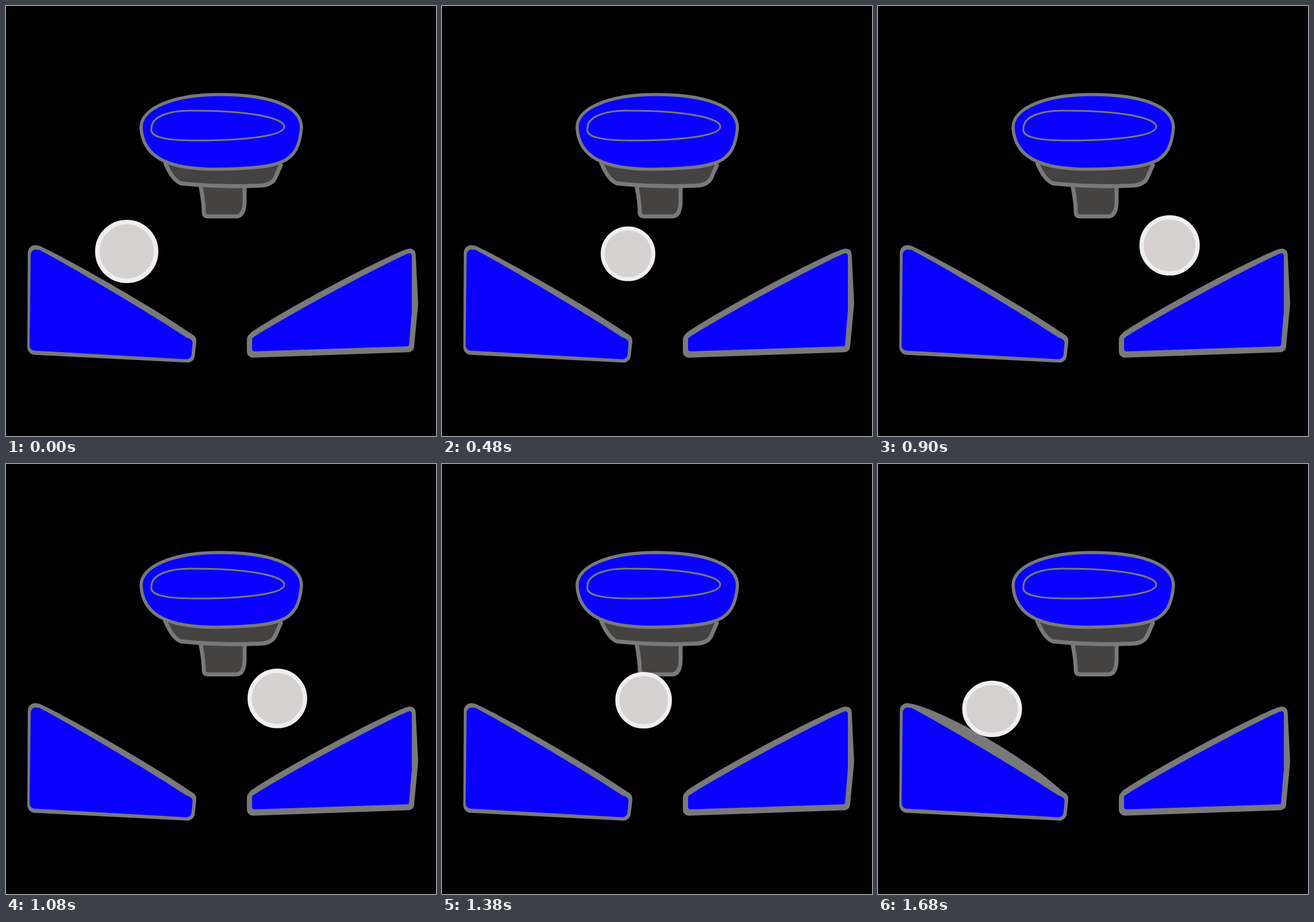
An HTML page with a canvas that plays this animation: 748x748 px, repeating every 1.74 s.

```html
<!DOCTYPE html>
<html>
<head>
<meta charset="utf-8">
<style>
html, body { margin: 0; width: 100%; height: 100%; overflow: hidden; background: #000; }
canvas { display: block; }
</style>
</head>
<body>
<canvas id="stage" width="748" height="748"></canvas>
<script>
const ctx = document.getElementById('stage').getContext('2d');
const STEP = 60, COUNT = 29;
const GRAY = '#797979', BLUE = '#0a00ff', DARK = '#444341';

const HEAD = 'M235,212 C234,178 290,154 372,154 S514,172 514,212 C508,275 480,282 365,284 C280,284 238,262 235,212 Z';
const SLOT = 'M253,213 C253,190 290,181 325,182 C420,182 484,194 484,210 C484,228 400,234 330,234 C270,234 250,226 253,213 Z';
const POST = 'M337,305 Q344,340 344,358 Q344,366 352,366 H400 Q414,366 415,342 V305';
const cup = bottom =>
  `M277,273 Q289,302 304,${bottom - 4} Q372,${bottom + 3} 440,${bottom} Q461,${bottom} 468,${bottom - 13} L478,277`;

// Each turn of the ball: when, where, what it strikes and how far that bends;
// lift is the height of the arc on the way to the next turn.
const turns = [
  { step: 0, x: 210, y: 427 },
  { step: 4, x: 296.5, y: 369, part: 'bumper', flex: 11 },
  { step: 6, x: 246, y: 461, part: 'left', flex: 11, lift: -8 },
  { step: 11, x: 440, y: 367, part: 'bumper', flex: 10 },
  { step: 14, x: 519, y: 453, part: 'right', flex: 11, lift: 76 },
  { step: 20, x: 448.5, y: 486.5, part: 'right', flex: 11 },
  { step: 25, x: 285.5, y: 360.5, part: 'bumper', flex: 7, lift: 17 },
  { step: 28, x: 198.5, y: 426, part: 'left', flex: 11 }
];

function paint(path, fill, stroke, width) {
  const shape = new Path2D(path);
  if (fill) { ctx.fillStyle = fill; ctx.fill(shape); }
  if (stroke) { ctx.strokeStyle = stroke; ctx.lineWidth = width; ctx.stroke(shape); }
}

// A bowed slope from a to b, closed through rounded corners
function wedge(color, bow, radius, a, b, ...corners) {
  const mix = u => [a[0] + (b[0] - a[0]) * u, a[1] + (b[1] - a[1]) * u - bow * 4 / 3];
  const path = new Path2D();
  path.moveTo(...a);
  path.bezierCurveTo(...mix(0.22), ...mix(0.78), ...b);
  corners.forEach((c, i) => path.arcTo(...c, ...(corners[i + 1] || a), radius));
  path.closePath();
  paint(path, color);
}

function drawRamps(left, right) {
  wedge(GRAY, 5 + left, 13, [58, 417], [319, 568], [332, 576], [327, 621], [37, 606], [38, 414]);
  wedge(BLUE, 3, 9, [58, 424], [313, 576], [325, 581], [322, 615], [41, 599], [43, 423]);
  wedge(GRAY, 6 + right, 10, [426, 568], [694, 424], [712, 419], [717, 518], [709, 602], [419, 612], [419, 576]);
  wedge(BLUE, 4, 4, [432, 575], [698, 431], [706, 429], [706, 530], [701, 592], [428, 601], [428, 578]);
}

function drawBumper(flex) {
  paint(POST, DARK, GRAY, 7);
  paint(cup(312.5 + flex), DARK, GRAY, 7);
  paint(HEAD, BLUE, GRAY, 5.5);
  paint(SLOT, null, GRAY, 3);
}

function drawBall(step) {
  const i = turns.findLastIndex(turn => turn.step <= step);
  const from = turns[i], to = turns[i + 1] || from;
  const u = (step - from.step) / (to.step - from.step || 1);
  const x = from.x + (to.x - from.x) * u;
  const y = from.y + (to.y - from.y) * u - (from.lift || 0) * 4 * u * (1 - u);

  // The size swings and settles; a strike flattens the ball
  const radius = 50.5 + 4.5 * Math.cos(Math.PI * step / 8) * Math.exp(-step / 20);
  const squash = u || !from.part ? 0 : from.part === 'bumper' ? -1 : 1.5;
  const rim = radius / 7;
  const path = new Path2D();
  path.ellipse(x, y, radius + squash - rim / 2, radius - squash - rim / 2, 0, 0, 2 * Math.PI);
  paint(path, '#d6d2d1', '#f0efef', rim);
}

function draw(now) {
  const step = Math.floor(now / STEP) % COUNT;
  const hit = turns.find(turn => turn.step === step) || {};
  const flex = part => hit.part === part ? hit.flex : 0;
  ctx.clearRect(0, 0, 748, 748);
  drawRamps(flex('left'), flex('right'));
  drawBumper(flex('bumper'));
  drawBall(step);
}

ctx.lineCap = ctx.lineJoin = 'round';
const start = performance.now();
function tick() {
  draw(performance.now() - start);
  requestAnimationFrame(tick);
}
tick();
</script>
</body>
</html>
```
